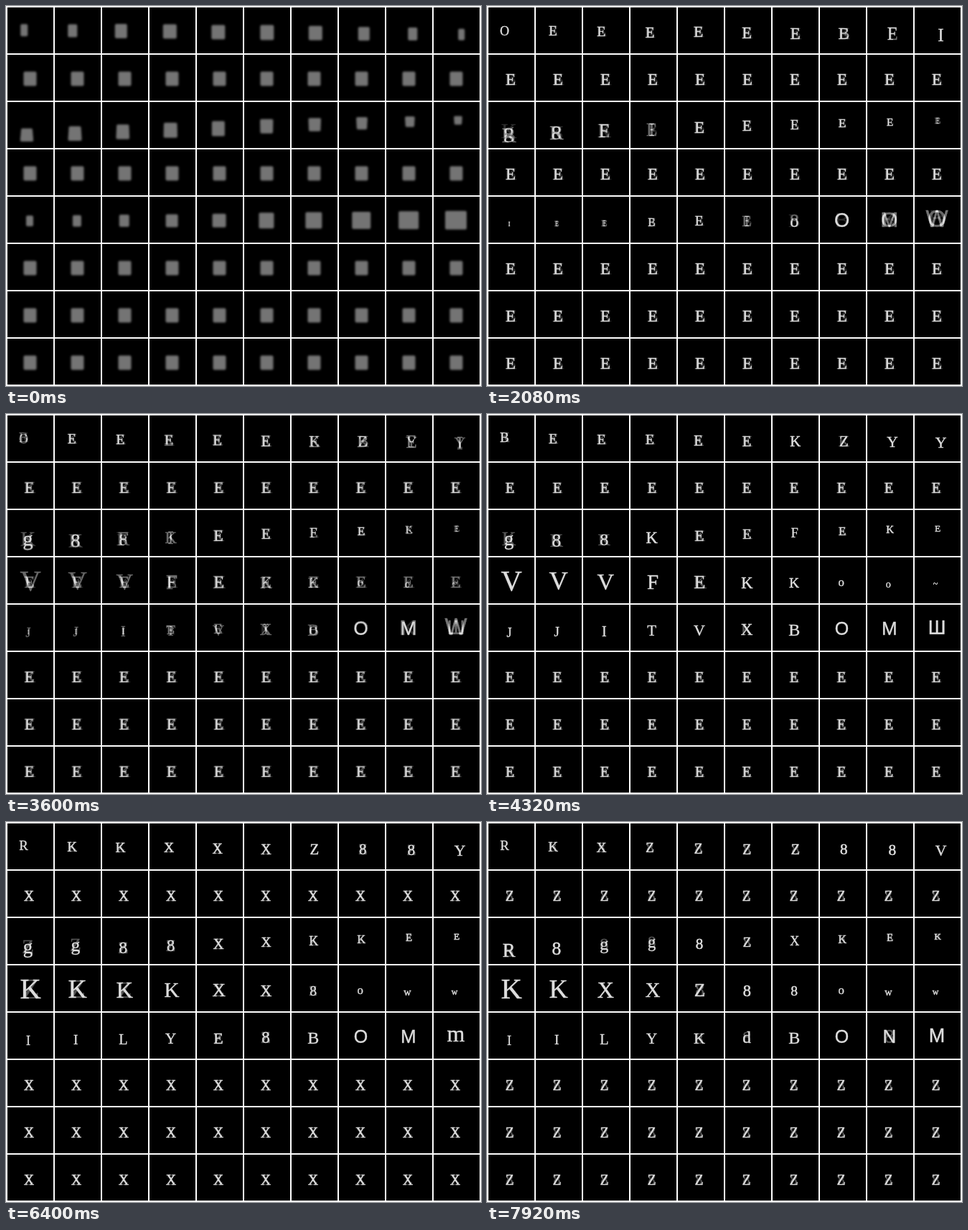
Animation of 662 by 530 pixels, one loop 8 s. Source, as an HTML page without scripts:

```html
<!DOCTYPE html>
<html lang="en">
<head>
<meta charset="utf-8">
<title>Letter grid</title>
<style>
/* --t counts 100 ticks of 80 ms; each layer peaks at --at and fades towards its neighbours. */
@property --t { syntax: "<number>"; inherits: true; initial-value: 0; }
@keyframes tick { to { --t: 100; } }

html, body { margin: 0; width: 100%; height: 100%; overflow: hidden; background: #000; }
.stage {
  position: relative; width: 662px; height: 530px; overflow: hidden;
  background: #000; isolation: isolate;
  animation: tick 8s steps(100) infinite;
}
.layer, .lines, svg { position: absolute; inset: 0; width: 662px; height: 530px; }
.layer {
  color: #ddd; font-family: "Liberation Serif", serif;
  filter: blur(.5px); mix-blend-mode: plus-lighter;
  opacity: min((var(--t) - var(--from)) / (var(--at) - var(--from)),
               (var(--to) - var(--t)) / (var(--to) - var(--at)));
}
.lines {
  background: repeating-linear-gradient(#fff 0 2px, #0000 0 66px),
              repeating-linear-gradient(90deg, #fff 0 2px, #0000 0 66px);
}

/* Row geometry: start value plus change across the ten columns. */
p { margin: 0; --q: 0; }
.r0 { --r: 0; --x: -9.5; --dx: 14; --y: 0; --dy: 7; --h: 12.5; --dh: 2; }
.r2 { --r: 2; --x: -3.5; --dx: 3.5; --y: 13.5; --dy: -20; --h: 18; --dh: -9; }
.r3 { --r: 3; --x: 0; --dx: -3; --y: 2; --dy: 3; --h: 27; --dh: -25; --q: 6; }
.r4 { --r: 4; --x: -3; --dx: 2; --y: 6.5; --dy: -6; --h: 12; --dh: 6; }
.early .r0 { --y: 1; --dy: 5.5; --h: 12; --dh: 5; }
.early .r2 { --h: 20; --dh: -11; }
.early .r4 { --y: 7; --dy: -8; --h: 5; --dh: 17; }

p > * {
  --n: calc(var(--i) / 9);
  --size: calc(1px * (var(--h) + var(--dh) * var(--n) + var(--q) * var(--n) * var(--n)));
  position: absolute;
  left: calc(34px + 66px * var(--i) + 1px * (var(--x) + var(--dx) * var(--n)));
  top: calc(34px + 66px * var(--r) + 1px * (var(--y) + var(--dy) * var(--n)));
  transform: translate(-50%, -51%);
  font-style: normal; font-weight: 400; text-decoration: none;
  font-size: calc(1.5 * var(--size)); line-height: 1;
  -webkit-text-stroke: .4px;
}
p > :nth-child(1) { --i: 0; }
p > :nth-child(2) { --i: 1; }
p > :nth-child(3) { --i: 2; }
p > :nth-child(4) { --i: 3; }
p > :nth-child(5) { --i: 4; }
p > :nth-child(6) { --i: 5; }
p > :nth-child(7) { --i: 6; }
p > :nth-child(8) { --i: 7; }
p > :nth-child(9) { --i: 8; }
p > :nth-child(10) { --i: 9; }
u { transform: translate(-50%, -71%); }
.r4 > :nth-child(n+8) { font-family: "Liberation Sans", sans-serif; }
.r4 > .wide { font: 32px/1 "Liberation Serif", serif; transform: translate(-50%, -61%); }

/* b and u carry a faint second letter, i does not. */
b::after, u::after {
  content: var(--ghost); position: absolute; left: 50%; top: 0;
  transform: translateX(-50%); opacity: .38;
}

/* Soft squares before any letter appears. */
.blobs { filter: blur(1.5px); }
.blobs b {
  height: var(--size); border-radius: 2px; background: #747474;
  width: calc(1px * (var(--w) + var(--dw) * var(--n) + var(--qw) * var(--n) * var(--n)));
}
.blobs b::after { content: none; }
.blobs .r0 { --x: -9; --dx: 15.5; --dy: 6; --h: 17; --dh: 16; --q: -17; --w: 9.5; --dw: 40; --qw: -40; }
.blobs .r2 { --x: -5; --dx: 7; --y: 13; --dy: -19; --h: 20; --dh: 8; --q: -14; --w: 17; --dw: 10; --qw: -16; }
.blobs .r2 b { transform: translate(-50%, -50%) perspective(45px) rotateX(calc((.45 - var(--n)) * 55deg)); }
.blobs .r4 { --x: -1; --dx: 0; --y: 2; --dy: -1; --h: 15; --dh: 11; --w: 10; --dw: 20; --qw: 0; }

pattern text { fill: #ddd; stroke: #ddd; stroke-width: .4px; font-size: 20px; text-anchor: middle; }
.early pattern text { font-size: 22.5px; }
pattern text + text { opacity: .38; }
</style>
</head>
<body>
<div class="stage">
  <div class="layer blobs" style="--from:-1;--at:0;--to:14">
    <svg>
      <pattern id="blob" width="66" height="66" patternUnits="userSpaceOnUse"><rect x="24.5" y="25.5" width="18" height="20" rx="2" fill="#747474"/></pattern>
      <path fill="url(#blob)" d="M0 66h662v66H0zM0 198h662v66H0zM0 330h662v198H0z"/>
    </svg>
    <p class="r0"><b></b><b></b><b></b><b></b><b></b><b></b><b></b><b></b><b></b><b></b></p>
    <p class="r2"><b></b><b></b><b></b><b></b><b></b><b></b><b></b><b></b><b></b><b></b></p>
    <p class="r4"><b></b><b></b><b></b><b></b><b></b><b></b><b></b><b></b><b></b><b></b></p>
  </div>

  <div class="layer early" style="--from:0;--at:14;--to:37;--ghost:'B'">
    <svg>
      <pattern id="soft-e" width="66" height="66" patternUnits="userSpaceOnUse"><text x="33" y="44">E</text><text x="33" y="44">B</text></pattern>
      <path fill="url(#soft-e)" d="M0 66h662v66H0zM0 198h662v66H0zM0 330h662v198H0z"/>
    </svg>
    <p class="r0"><i>O</i><b>E</b><b>E</b><b>E</b><b>E</b><b>E</b><b>E</b><b>E</b><i>F</i><i>I</i></p>
    <p class="r2"><b>R</b><b>R</b><b>E</b><b>E</b><b>E</b><b>E</b><b>E</b><b>E</b><b>E</b><b>E</b></p>
    <p class="r4"><i>I</i><b>E</b><b>E</b><b>E</b><b>E</b><b>E</b><b>8</b><b>O</b><b>O</b><b>O</b></p>
  </div>

  <div class="layer early" style="--from:14;--at:37;--to:54;--ghost:'K'">
    <svg>
      <pattern id="ek" width="66" height="66" patternUnits="userSpaceOnUse"><text x="33" y="44">E</text><text x="33" y="44">K</text></pattern>
      <path fill="url(#ek)" d="M0 66h662v66H0zM0 198h662v66H0zM0 330h662v198H0z"/>
    </svg>
    <p class="r0"><i>O</i><b>E</b><b>E</b><b>E</b><b>E</b><b>E</b><b>E</b><b>B</b><i>E</i><i>I</i></p>
    <p class="r2"><u>g</u><b>8</b><b>F</b><i>I</i><b>E</b><b>E</b><b>E</b><b>E</b><i>E</i><i>I</i></p>
    <p class="r4"><i>I</i><i>I</i><i>I</i><b>B</b><b>E</b><i>I</i><i>o</i><i>O</i><b>M</b><i>W</i></p>
  </div>

  <div class="layer" style="--from:37;--at:54;--to:66;--ghost:'K'">
    <svg>
      <pattern id="ke" width="66" height="66" patternUnits="userSpaceOnUse"><text x="32" y="44">E</text><text x="32" y="44">K</text></pattern>
      <path fill="url(#ke)" d="M0 66h662v66H0zM0 330h662v198H0z"/>
    </svg>
    <p class="r0"><b>B</b><b>E</b><b>E</b><b>E</b><b>E</b><b>E</b><b>K</b><b>Z</b><i>Y</i><i>Y</i></p>
    <p class="r2"><u>g</u><b>8</b><b>8</b><b>K</b><b>E</b><b>E</b><i>F</i><b>E</b><b>K</b><i>E</i></p>
    <p class="r3"><i>V</i><i>V</i><i>V</i><i>F</i><b>E</b><b>K</b><b>K</b><i>o</i><i>o</i><i>~</i></p>
    <p class="r4"><i>J</i><i>J</i><i>I</i><i>T</i><i>V</i><b>X</b><i>B</i><i>O</i><i>M</i><i>Ш</i></p>
  </div>

  <div class="layer" style="--from:54;--at:66;--to:80;--ghost:'E'">
    <svg>
      <pattern id="k" width="66" height="66" patternUnits="userSpaceOnUse"><text x="32.5" y="44">K</text><text x="32.5" y="44">E</text></pattern>
      <path fill="url(#k)" d="M0 66h662v66H0zM0 330h662v198H0z"/>
    </svg>
    <p class="r0"><b>R</b><b>E</b><b>K</b><b>K</b><b>K</b><b>K</b><b>K</b><b>Z</b><b>8</b><i>Y</i></p>
    <p class="r2"><u>g</u><i>8</i><b>8</b><b>X</b><b>K</b><b>K</b><b>E</b><b>E</b><b>E</b><b>E</b></p>
    <p class="r3"><i>P</i><i>P</i><b>P</b><b>K</b><b>K</b><b>X</b><b>H</b><i>o</i><i>o</i><i>w</i></p>
    <p class="r4"><i>I</i><i>I</i><i>L</i><i>T</i><b>F</b><b>8</b><i>B</i><i>O</i><i>M</i><i class="wide">m</i></p>
  </div>

  <div class="layer" style="--from:66;--at:80;--to:99;--ghost:'Z'">
    <svg>
      <pattern id="x" width="66" height="66" patternUnits="userSpaceOnUse"><text x="32" y="44">X</text><text x="32" y="44">Z</text></pattern>
      <path fill="url(#x)" d="M0 66h662v66H0zM0 330h662v198H0z"/>
    </svg>
    <p class="r0"><i>R</i><b>K</b><b>K</b><b>X</b><b>X</b><b>X</b><b>Z</b><b>8</b><b>8</b><i>Y</i></p>
    <p class="r2"><u>g</u><u>g</u><b>8</b><b>8</b><b>X</b><b>X</b><b>K</b><b>K</b><b>E</b><b>E</b></p>
    <p class="r3"><b>K</b><b>K</b><b>K</b><i>K</i><b>X</b><b>X</b><b>8</b><i>o</i><i>w</i><i>w</i></p>
    <p class="r4"><i>I</i><i>I</i><i>L</i><i>Y</i><b>E</b><b>8</b><i>B</i><i>O</i><i>M</i><i class="wide">m</i></p>
  </div>

  <div class="layer" style="--from:80;--at:99;--to:100;--ghost:'8'">
    <svg>
      <pattern id="z" width="66" height="66" patternUnits="userSpaceOnUse"><text x="31.5" y="44">Z</text><text x="31.5" y="44">8</text></pattern>
      <path fill="url(#z)" d="M0 66h662v66H0zM0 330h662v198H0z"/>
    </svg>
    <p class="r0"><i>R</i><b>K</b><b>X</b><b>Z</b><b>Z</b><b>Z</b><b>Z</b><b>8</b><b>8</b><i>V</i></p>
    <p class="r2"><b>R</b><b>8</b><u>g</u><u>g</u><b>8</b><b>Z</b><i>X</i><b>K</b><b>E</b><b>K</b></p>
    <p class="r3"><i>K</i><i>K</i><i>X</i><i>X</i><b>Z</b><b>8</b><b>8</b><i>o</i><i>w</i><i>w</i></p>
    <p class="r4"><i>I</i><i>I</i><i>L</i><i>Y</i><b>K</b><b>d</b><i>B</i><i>O</i><b>N</b><i>M</i></p>
  </div>

  <div class="lines"></div>
</div>
</body>
</html>
```
